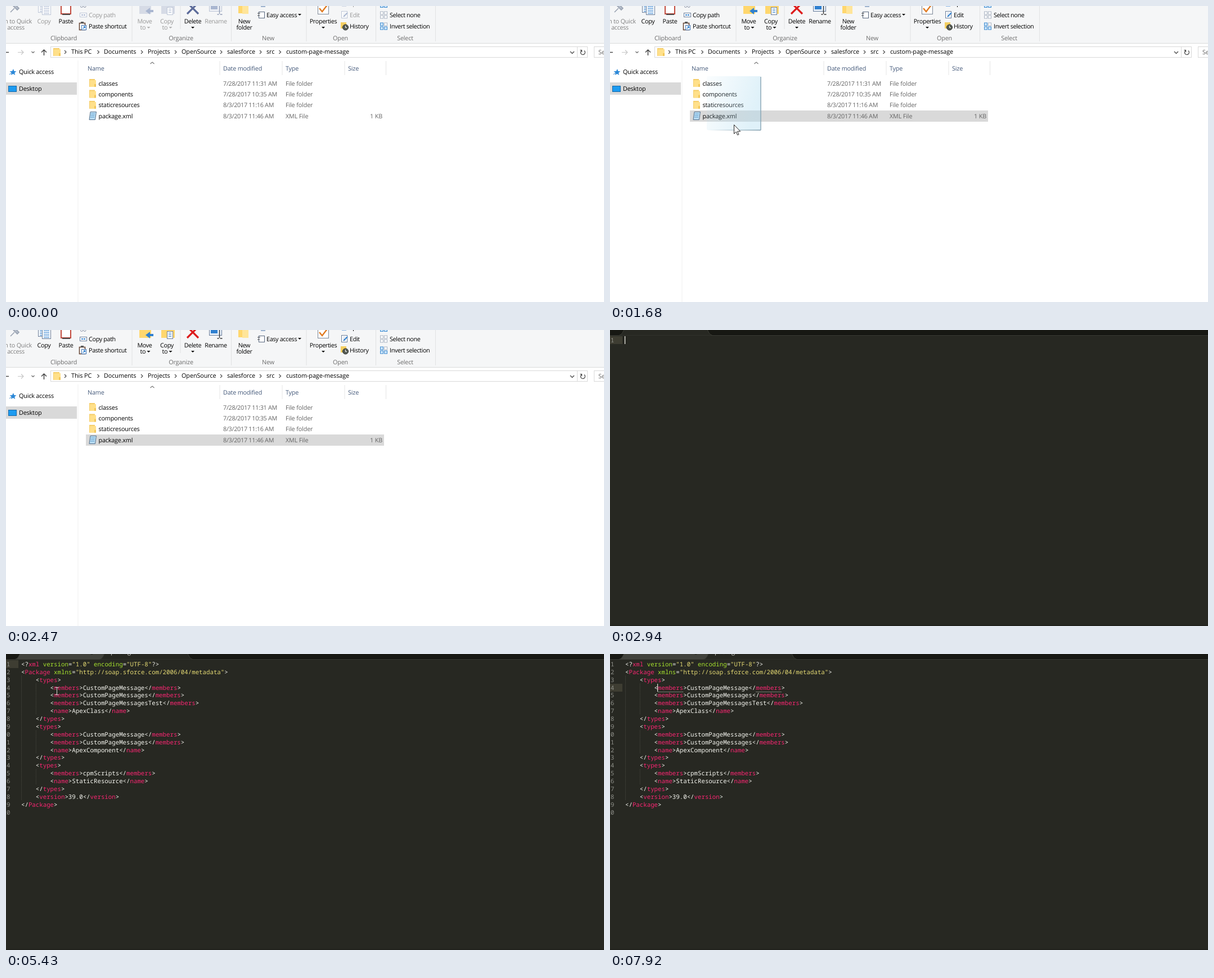
Animation of 1063x527 px, one loop 8000 ms. Source, as an HTML page:

```html
<!DOCTYPE html>
<html lang="en">
<head>
<meta charset="utf-8">
<title>Opening package.xml</title>
<style>
html, body { margin: 0; width: 100%; height: 100%; overflow: hidden; background: #fff; }
svg { display: block; }
text { font-family: "Open Sans", "Noto Sans", sans-serif; font-size: 10.8px; white-space: pre; text-rendering: geometricPrecision; }
.code text { font-family: "Noto Sans Mono", "DejaVu Sans Mono", monospace; font-size: 10.75px; }
.code .title { font: 11px "Open Sans", sans-serif; }
</style>
</head>
<body>
<svg id="stage" width="1063" height="527" viewBox="0 0 1063 527"></svg>
<script>
const LOOP = 8000;
const LINE = 13.87, CHAR = 6.45;
const INK = '#000', GREY = '#646464', OFF = '#999', HEAD = '#44597a';

const esc = s => s.replace(/&/g, '&amp;').replace(/</g, '&lt;');
const rect = (x, y, w, h, fill, more = '') =>
  `<rect x="${x}" y="${y}" width="${w}" height="${h}" fill="${fill}" ${more}/>`;
const path = (d, stroke, width = 1, fill = 'none') =>
  `<path d="${d}" stroke="${stroke}" stroke-width="${width}" fill="${fill}"/>`;
const text = (x, y, s, fill = INK, gap = -0.18, anchor = 'start') =>
  `<text x="${x}" y="${y}" fill="${fill}" letter-spacing="${gap}" text-anchor="${anchor}">${esc(s)}</text>`;
const label = (x, y, s, fill = INK) => text(x, y, s, fill, -0.35);
const mid = (x, y, s, fill = INK) => text(x, y, s, fill, -0.35, 'middle');
const drop = (x, y, fill = INK) => path(`M${x - 3} ${y}h6l-3 3z`, 'none', 0, fill);
const chevron = (x, y) => path(`M${x - 1.5} ${y - 3}l3 3l-3 3`, '#444', 1.1);
const vline = (x, y, h, color) => rect(x, y, 1, h, color);

function folder(x, y, w = 12, h = 14) {
  return rect(x, y, w - 2, h, '#f5cd68') + rect(x + 1, y + 2, w - 1, h - 2, '#ffe08a') +
    rect(x + w - 3, y + h - 5, 3, 5, '#f2c75a');
}

function sheet(x, y, w, h, edge, ink) {
  let s = rect(x + 0.5, y + 0.5, w - 1, h - 1, '#fff', `stroke="${edge}"`);
  for (let i = 3; i < h - 2; i += 3) s += rect(x + 3, y + i, w - 6, 1, ink);
  return s;
}

// Ribbon parts that depend on whether a file is selected
function actions(on) {
  const ink = on ? INK : OFF;
  const blue = on ? '#2f80d0' : '#a9b6d0';
  const edge = on ? '#6a7d99' : '#bcc5d6';
  const box = on ? '#ffd76e' : '#d6dbe6';
  const arrow = on ? INK : '#b0b0b0';
  return sheet(57, -6, 15, 18, edge, blue) + sheet(64, -2, 16, 18, edge, blue) + mid(67.5, 31, 'Copy', ink) +
    rect(131.5, 12.5, 12, 7, '#fff', `stroke="${edge}"`) + path('M134 16h3m1 0h3', blue, 2) + label(147, 20, 'Copy path', ink) +
    rect(237, -4, 21, 18, box) + path('M262 7h-6v-4l-8 6l8 6v-4h6z', 'none', 0, blue) +
    mid(246.5, 31, 'Move', ink) + label(238.5, 42, 'to', ink) + drop(253.5, 37, arrow) +
    rect(276, -4, 24, 18, box) + sheet(286, 2, 11, 14, edge, blue) +
    mid(286, 31, 'Copy', ink) + label(277.5, 42, 'to', ink) + drop(292.5, 37, arrow) +
    path('M322 -6l20 20m0 -20l-20 20', on ? '#dd1c1c' : '#5c6b9a', 3.2) +
    rect(361.5, -4.5, 22, 14, on ? '#e8f1fb' : '#eef0f5', `stroke="${edge}"`) + rect(364, -1, 12, 7, blue) +
    path('M379.5 -2v16m-4 1h3m2 0h4', on ? '#333' : '#8f9bb5', 1.4) + mid(373, 31, 'Rename', ink) +
    sheet(596, 9, 11, 13, edge, on ? '#b7c6da' : '#dde2ea') + path('M600 19l7 -7', blue, 2) +
    label(611, 20, 'Edit', ink) + rect(597, -3, 8, 4, on ? '#8ab6e6' : '#cdd5e3') + path('M617.5 -2v4', ink);
}

function tiles(y, colors) {
  return colors.map((c, i) => rect(665.5 + i % 2 * 7, y + (i >> 1) * 7, 5, 5, c[0], `stroke="${c[1]}"`)).join('');
}

function ribbon() {
  const plain = ['#fff', '#a9b3c2'], lit = ['#cfe6fa', '#3b8ad0'];
  let s = rect(0, 0, 1063, 66, '#f5f6f7') + rect(0, 66, 1063, 1, '#dadbdc');
  for (const x of [223.5, 400, 533.5, 657, 763]) s += vline(x, 0, 63, '#e1e2e3');
  s += vline(309.5, 0, 41, '#e1e2e3');
  s += path('M8 11l7 -7m-4 -6l9 9l3 -3l-4 -4v-4z', '#9aa3b2', 1.6, '#b4bcc9');
  s += text(46, 31, 'Pin to Quick', '#808080', -0.25, 'end') + mid(17.5, 42, 'access', '#808080');
  s += rect(97, -5, 19, 20, '#c24a3d') + rect(99, -5, 15, 18, '#fff') + rect(100, 14, 14, 2, '#4a4a4a') + mid(106.5, 31, 'Paste');
  for (const x of [134.5, 140]) s += `<circle cx="${x}" cy="0.5" r="2" fill="none" stroke="#8a94a8"/>`;
  s += rect(130.5, 30.5, 10, 12, '#fff', 'stroke="#6b4a3a" stroke-width="1.6"') + rect(133, 28, 5, 3, '#555') +
    rect(134.5, 34.5, 8, 8, '#fff', 'stroke="#3b6fb0"') + path('M136.5 40.5l4 -4m-3 0h3v3', '#2f80d0', 1.2);
  s += label(147, 40, 'Paste shortcut');
  s += mid(332, 31, 'Delete') + drop(332, 37);
  s += rect(413, -4, 15, 17, '#ffd76e') + rect(420, -2, 11, 16, '#ffe59a') + mid(423.5, 31, 'New') + mid(423.5, 42, 'folder');
  s += rect(453, -3, 8, 5, '#9fb4cf') + rect(449.5, 10.5, 10, 11, '#fff', 'stroke="#59687f"') + path('M447 13h5m-5 4h4', '#444', 1.2);
  s += label(463, 20, 'Easy access') + drop(522, 14);
  s += rect(554.5, -4.5, 19, 19, '#fff', 'stroke="#7b8796"') + path('M557 4l5 6l10 -13', '#e07b22', 2.4) + mid(564, 31, 'Properties') + drop(564, 37);
  s += rect(595, 29, 10, 11, '#f4cf62') + `<circle cx="603.5" cy="38" r="5" fill="#555b54" stroke="#2f332f"/>` +
    path('M603.5 35v3.5h2.5', '#fff') + label(611, 40, 'History');
  s += tiles(-9.5, [lit, lit, lit, lit]) + tiles(10, [plain, plain, plain, plain]) + tiles(30, [lit, plain, lit, lit]);
  s += label(682, 20, 'Select none') + label(682, 40, 'Invert selection');
  for (const [x, name] of [[102.5, 'Clipboard'], [311, 'Organize'], [466, 'New'], [594.5, 'Open'], [709.5, 'Select']])
    s += text(x, 61, name, '#6c6c6c', -0.18, 'middle');
  return s;
}

function address() {
  let s = rect(79.5, 72.5, 954, 19, '#fff', 'stroke="#d9d9d9"') + vline(1015, 73, 19, '#d9d9d9') +
    rect(1045.5, 72.5, 40, 19, '#fff', 'stroke="#d9d9d9"');
  s += path('M-4 82.5h9', '#444', 1.4) + path('M21 82.5h10m-4 -4l4 4l-4 4', '#c6c6c6', 1.2) +
    path('M45.5 81l2.5 2.5l2.5 -2.5', '#666', 1.2) + path('M67.5 88v-10m-4.5 4.5l4.5 -4.5l4.5 4.5', '#444', 1.5);
  s += folder(84, 75, 13, 14);
  const crumbs = [[116, 'This PC'], [174, 'Documents'], [252, 'Projects'], [312, 'OpenSource'],
    [393, 'salesforce'], [463, 'src'], [498, 'custom-page-message']];
  for (const [x, name] of crumbs) s += text(x, 85, name, INK, -0.06);
  for (const x of [105.5, 164, 241.5, 301.5, 382.5, 452.5, 487]) s += chevron(x, 82);
  s += path('M1003 81l3.5 3.5l3.5 -3.5', '#555', 1.5) +
    path('M1028 79.5a4 4 0 1 1 -4.5 -0.5m0 3.200v-3.700h-3', '#444', 1.2) + text(1053, 86, 'Search', GREY);
  return s;
}

function listing() {
  let s = vline(127.5, 97, 430, '#f0f0f0') + rect(0, 136, 126, 22, '#d9d9d9');
  s += path('M13 112l1.4 4l4 .3l-3.2 2.6l1 4l-3.6 -2.2l-3.6 2.2l.8 -4l-3.2 -2.6l4.4 -.4z', 'none', 0, '#2b88d8') + path('M6 122l4 -3', '#7aa9d4', 1.2);
  s += text(23, 121, 'Quick access') + rect(4.5, 142.5, 14, 10, '#1d9bf0', 'stroke="#1668a8"') + text(23, 151, 'Desktop');
  for (const x of [379.5, 490.5, 601.5, 675]) s += vline(x, 98, 25, '#e5e5e5');
  s += path('M256.5 103l3.5 -3l3.5 3', '#777', 1.1);
  for (const [x, name] of [[145, 'Name'], [386, 'Date modified'], [497, 'Type'], [608, 'Size']]) s += text(x, 115, name, HEAD);
  s += rect(142, 186, 530, 20, '#fff', 'id="row"');
  const files = [['classes', '7/28/2017 11:31 AM'], ['components', '7/28/2017 10:35 AM'],
    ['staticresources', '8/3/2017 11:16 AM'], ['package.xml', '8/3/2017 11:46 AM']];
  files.forEach(([name, date], i) => {
    const y = 141.5 + i * 19.45, xml = i === 3;
    s += xml ? path('M150 188.5h10.5l-2 14h-10.5z', '#54708c', 1, '#b9dcf2') + path('M151 192h7m-7.5 3h7m-7.5 3h7', '#5f9fd0', 1)
             : folder(148, y - 11.5);
    s += text(164.5, y, name) + text(386, y, date, GREY, -0.27) + text(497, y, xml ? 'XML File' : 'File folder', GREY, -0.14);
  });
  return s + text(669, 200, '1 KB', GREY, -0.18, 'end');
}

const xml = `<?xml version="1.0" encoding="UTF-8"?>
<Package xmlns="http://soap.sforce.com/2006/04/metadata">
    <types>
        <members>CustomPageMessage</members>
        <members>CustomPageMessages</members>
        <members>CustomPageMessagesTest</members>
        <name>ApexClass</name>
    </types>
    <types>
        <members>CustomPageMessage</members>
        <members>CustomPageMessages</members>
        <name>ApexComponent</name>
    </types>
    <types>
        <members>cpmScripts</members>
        <name>StaticResource</name>
    </types>
    <version>39.0</version>
</Package>
`.split('\n');

const span = (s, fill) => `<tspan fill="${fill}">${esc(s)}</tspan>`;
const paint = line => line.replace(/("[^"]*")|(<[\/?]?)(\w+)|(\w+)(?==)|[^]/g, (m, str, open, tag, attr) =>
  str ? span(str, '#e6db74') : tag ? esc(open) + span(tag, '#f92672') : attr ? span(attr, '#a6e22e') : esc(m));

function codeLines() {
  return xml.map((line, i) => {
    const body = line.trimStart(), pad = line.length - body.length, y = 22 + i * LINE;
    let s = `<text x="7.5" y="${y}" fill="#8f908a" text-anchor="end">${i + 1}</text>`;
    for (let c = 0; c < pad; c += 4)
      s += `<path d="M${27.5 + c * CHAR} ${y - 11}v${LINE}" stroke="#4a4a42" stroke-dasharray="1 1"/>`;
    return s + `<text x="${27 + pad * CHAR}" y="${y}" fill="#f8f8f2">${paint(body)}</text>`;
  }).join('');
}

function tabShape(l, r, fill) {
  return path(`M${l - 6} 9.5C${l} 8 ${l} 4 ${l + 4} -2H${r - 4}C${r} 4 ${r} 8 ${r + 6} 9.5`, '#3d3e37', 1, fill);
}

function editor() {
  const bg = '#272822';
  const bar = rect(0, 0, 1063, 9, '#171813') + rect(0, 8, 1063, 1, '#0f100c') + rect(0, 9, 1063, 1, '#3a3b34');
  return rect(0, 0, 1063, 527, bg) + rect(0, 525, 1063, 2, '#21221d') + bar +
    rect(0, 11, 22, 14, '#3e3d32', 'id="mark"') +
    `<g id="blank">${tabShape(22, 176, bg)}<text x="1" y="22" fill="#8f908a">1</text></g>
    <g id="doc">${tabShape(22, 176, '#42433d')}${path('M151 -2l3 3m0 -3l-3 3', '#23241f', 1.2)}${tabShape(172, 326, bg)}
    <text class="title" x="186" y="-0.5" fill="#d8d8d2">package.xml</text>${codeLines()}</g>
    <path id="match" d="M85 67.5h46M259.5 67.5h45" stroke="#c8c8c0" stroke-dasharray="1 1"/>` +
    rect(26, 11, 1.2, 14, '#f8f8f0', 'id="caret"');
}

const stage = document.getElementById('stage');
stage.innerHTML = `
<defs>
  <linearGradient id="ghostFill" x1="0" y1="0" x2="1" y2="0.3">
    <stop offset="0" stop-color="#afdcf0" stop-opacity="0.06"/><stop offset="1" stop-color="#afdcf0" stop-opacity="0.4"/>
  </linearGradient>
  <linearGradient id="ghostEdge"><stop offset="0" stop-color="#86a3b2" stop-opacity="0"/><stop offset="1" stop-color="#86a3b2" stop-opacity="0.8"/></linearGradient>
</defs>
<g id="explorer">${rect(0, 0, 1063, 527, '#fff')}${ribbon()}<g id="idle">${actions(false)}</g><g id="active">${actions(true)}</g>${address()}${listing()}</g>
<g id="ghost">${rect(0, 0, 96, 96, 'url(#ghostFill)', 'rx="2"')}${rect(2, 95, 94, 2, 'url(#ghostEdge)')}${rect(95, 1, 2, 95, '#86a3b2', 'opacity="0.7"')}</g>
<path id="arrow" d="M.5 .5v16l3.7 -3.5l2.5 5.7l2.3 -1l-2.5 -5.5h5.2z" fill="#fff" stroke="#222"/>
<g id="editor" class="code">${editor()}</g>
<path id="beam" d="M-2.5 -6.5h2.5l.5 .5l.5 -.5h2.5M.5 -6.5v13M-2.5 6.5h2.5l.5 -.5l.5 .5h2.5" fill="none" stroke="#d8d8d4"/>`;

const $ = id => document.getElementById(id);
const show = (id, on) => $(id).setAttribute('display', on ? 'inline' : 'none');
const move = (id, x, y) => $(id).setAttribute('transform', `translate(${Math.round(x)} ${Math.round(y)})`);

// Monotone cubic through [time, x, y] keys
function along(keys, t) {
  const n = keys.length - 1;
  let i = 0;
  while (i < n - 1 && t >= keys[i + 1][0]) i++;
  const a = keys[i], b = keys[i + 1], w = b[0] - a[0];
  const u = Math.min(1, Math.max(0, (t - a[0]) / w));
  const slope = (j, k) => j < 0 || j >= n ? 0 : (keys[j + 1][k] - keys[j][k]) / (keys[j + 1][0] - keys[j][0]);
  const tangent = (j, k) => {
    const p = slope(j - 1, k), q = slope(j, k);
    return p * q > 0 ? 2 * p * q / (p + q) : 0;
  };
  return [1, 2].map(k => {
    const v = 1 - u;
    return a[k] * v * v * (1 + 2 * u) + b[k] * u * u * (3 - 2 * u) +
      w * u * v * (v * tangent(i, k) - u * tangent(i + 1, k));
  });
}

const arrowKeys = [[500, 430, 377], [780, 300, 275], [1140, 205, 197], [1600, 205, 197], [1680, 220, 211],
  [1920, 403, 308], [2160, 583, 419], [2310, 663, 506], [2400, 723, 575], [2470, 760, 640]];
const beamKeys = [[3260, 590, 406], [3410, 572, 366], [3560, 553, 344], [3730, 553, 340], [4000, 538, 308], [4420, 478, 226],
  [4800, 300, 160], [5280, 100, 85], [5430, 90, 66], [5750, 90, 66], [6220, 110, 206], [6370, 111, 207], [7060, 894, 510], [7210, 894, 509]];

const blink = (t, peak) => Math.min(1, Math.max(0, 0.5 + 0.8 * Math.cos((t - peak) / 1020 * 2 * Math.PI)));

function draw(t) {
  const editing = t >= 2940, loaded = t >= 3260, clicked = t >= 5600;
  show('explorer', !editing);
  show('editor', editing);

  const [ax, ay] = along(arrowKeys, t);
  show('arrow', t >= 500 && t < 2470);
  show('ghost', t >= 1680 && t < 2470);
  move('arrow', ax, ay);
  move('ghost', ax - 48, ay - 86);
  show('idle', t < 1380);
  show('active', t >= 1380);
  $('row').setAttribute('fill', t < 1060 ? '#fff' : t < 1290 ? '#e5f3ff' : t < 1680 ? '#cce8ff' : '#d9d9d9');

  show('blank', !loaded);
  show('doc', loaded);
  show('match', clicked);
  $('mark').setAttribute('y', clicked ? 53 : 11);
  const caret = $('caret');
  caret.setAttribute('x', clicked ? 84 : 26);
  caret.setAttribute('y', clicked ? 53 : 11);
  caret.setAttribute('opacity', !loaded ? 1 : blink(t, clicked ? 7750 : 3880).toFixed(3));

  const [bx, by] = along(beamKeys, t);
  show('beam', loaded && t < 7210);
  move('beam', bx, by);
}

const start = performance.now();
function tick() {
  draw((performance.now() - start) % LOOP);
  requestAnimationFrame(tick);
}
tick();
</script>
</body>
</html>
```
